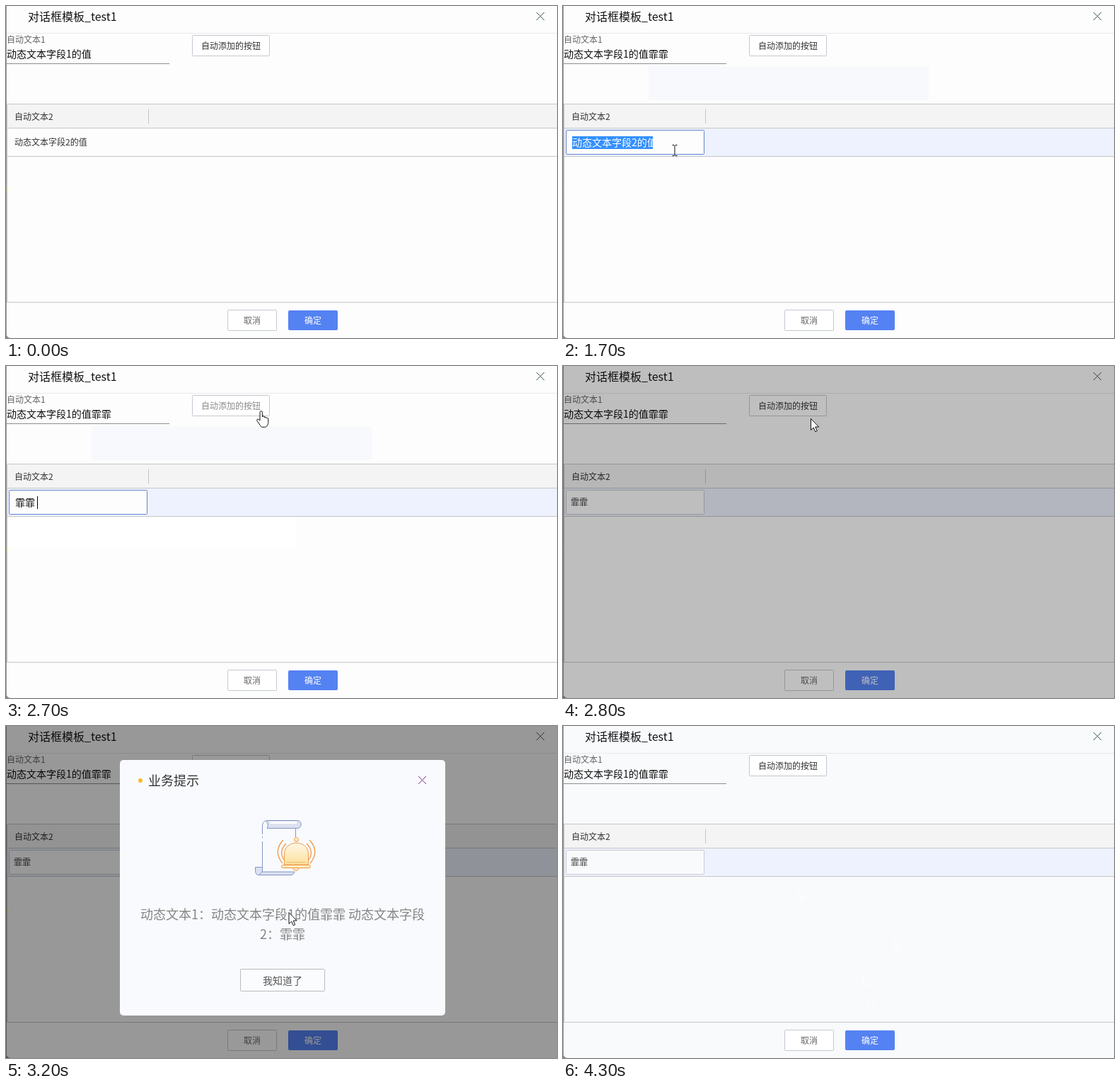
An HTML page for the animation above (4.9 s loop, 779 by 469 pixels).

```html
<!DOCTYPE html>
<html lang="zh-CN">
<head>
<meta charset="utf-8">
<title>对话框模板</title>
<style>
html, body { margin: 0; width: 779px; height: 469px; overflow: hidden; background: #fdfdfd; }
svg { display: block; font: 12px "Noto Sans CJK SC", "Noto Sans CJK", sans-serif; }
text { fill: #333; white-space: pre; }
.mid { text-anchor: middle; }
.s14 { font-size: 14px; }
.s18 { font-size: 18px; }
.dark { fill: #111; }
.line { fill: none; stroke: #c6c6c6; }
.box { fill: #fff; stroke: #c4c8d2; }
.cursor { fill: #fff; stroke: #111; stroke-linejoin: round; }
.roll { fill: #dce1f0; stroke: #8496c4; }
.paper { fill: none; stroke: #8496c4; }
.bell { fill: url(#gold); stroke: #f0994a; }
.wave { fill: none; stroke: #f0994a; stroke-width: 1.3; }
.trace { fill: none; stroke: #fff; }
</style>
</head>
<body>
<svg width="779" height="469" viewBox="0 0 779 469">
  <defs>
    <linearGradient id="gold" x2="0" y2="1">
      <stop stop-color="#fff8e6"/><stop offset="1" stop-color="#fde09a"/>
    </linearGradient>
    <path id="arrow" d="M.5 .5V16.5L4.2 13 6.7 18.8 9.2 17.7 6.7 12H11.7Z"/>
    <path id="hand" d="M5 14V2.4a1.7 1.7 0 0 1 3.4 0V9a1.5 1.5 0 0 1 3 .3V10a1.5 1.5 0 0 1 2.8.6V11a1.4 1.4 0 0 1 2.6.6V16c0 4-2 7.3-5 7.3H9c-2 0-3-1-4-3L1 14.5c-1-2 1-3.2 2.3-2Z"/>
    <path id="beam" d="M-3.5 -7.5H-1L0 -6.5 1 -7.5H3.5M0 -6.5V6.5M-3.5 7.5H-1L0 6.5 1 7.5H3.5" fill="none"/>
    <path id="cross" d="M0 0L11 11M11 0L0 11"/>
  </defs>

  <rect id="page" width="779" height="469"/>
  <path d="M.5 0V469" class="line" style="stroke:#999"/>
  <path d="M0 463Q1 468 6 469H0Z" fill="#888"/>
  <rect y="257" width="1" height="4" fill="#b5ad48"/>
  <text x="31" y="20.5" class="dark" font-size="16">对话框模板_test1</text>
  <use href="#cross" x="750" y="9" stroke="#3c5a42"/>
  <path d="M1 38.5H779" class="line" style="stroke:#e8e8e8"/>

  <rect id="panel1" x="121" y="85" width="396" height="48" fill="#f8f9fc"/>
  <text x="1" y="52" style="fill:#666">自动文本1</text>
  <text id="value1" x="1" y="73" class="s14 dark"></text>
  <path id="caret1" class="line" style="stroke:#000"/>
  <path d="M1 81.5H231" class="line" style="stroke:#8f8f8f"/>
  <rect x="263.5" y="41.5" width="109" height="29" rx="1" class="box"/>
  <text id="action" x="318" y="61" class="mid">自动添加的按钮</text>

  <rect x="2" y="139" width="777" height="33" fill="#f4f4f4"/>
  <rect id="row" x="2" y="173" width="777" height="39" fill="#eef2fe"/>
  <rect id="panel2" x="2" y="213" width="407" height="44" fill="#fff"/>
  <path d="M779 138.5H1.5V418.5H779M2 172.5H779M2 212.5H779M201.5 146V166" class="line"/>
  <text x="12" y="161">自动文本2</text>
  <rect id="input" x="4.5" y="175.5" width="195" height="34" rx="1"/>
  <rect id="selection" x="13" y="184" width="114" height="18" fill="#3390ff"/>
  <text id="value2"></text>
  <path id="caret2" d="M44.5 184V202" class="line" style="stroke:#000"/>

  <rect x="313.5" y="429.5" width="69" height="29" rx="1" class="box"/>
  <text x="348" y="449" class="mid" style="fill:#666">取消</text>
  <rect x="399" y="430" width="70" height="28" rx="2" fill="#5582f3"/>
  <text x="434" y="449" class="mid" style="fill:#fff;font-weight:500">确定</text>

  <rect id="dim" width="779" height="469"/>
  <g id="modal">
    <rect x="161" y="48" width="460" height="361" rx="5" fill="#f8fafd"/>
    <circle cx="190" cy="77" r="3" fill="#fbb929"/>
    <text x="201" y="84" class="s18">业务提示</text>
    <use href="#cross" x="583" y="71" stroke="#7c3a80"/>

    <path class="paper" d="M362.5 153V141Q362.5 133.5 370 133.5M362.5 156V158M362.5 163V199M409.5 144V157"/>
    <path class="roll" d="M370 133.5H412A5 5.3 0 0 1 412 144.5H369Q372 139 368 135.5Z"/>
    <path d="M373 136.5H411" stroke="#fff" stroke-width="3"/>
    <path class="roll" d="M352.5 199.5H362.5V204Q362.5 210.5 357.5 210.5T352.5 204Z"/>
    <path class="roll" d="M357.5 210.5H403Q407 210 408 206H362Z"/>
    <circle class="bell" cx="410.5" cy="160.5" r="3"/>
    <path class="bell" d="M393.5 196V181C393.5 160 427.5 160 427.5 181V196Z"/>
    <path d="M397 192.5H424" stroke="#f5ba68"/>
    <rect class="bell" x="389.5" y="196.5" width="41" height="4" rx="2"/>
    <path class="bell" d="M405.5 200.5H414.5Q413 204.5 410 204.5T405.5 200.5Z"/>
    <path class="wave" d="M392 161Q377 177 391 194M396 166Q385 177 393 189M429 161Q444 177 430 194M425 166Q436 177 428 189"/>

    <g class="mid s18">
      <text x="391" y="273" style="fill:#858585">动态文本1：动态文本字段1的值霏霏 动态文本字段</text>
      <text x="391" y="301" style="fill:#858585">2：霏霏</text>
    </g>
    <rect x="331.5" y="343.5" width="119" height="31" rx="1" fill="#fbfcfe" stroke="#bbb"/>
    <text x="391" y="365" class="mid s14" style="fill:#555">我知道了</text>
  </g>

  <g id="traces" class="trace">
    <use href="#arrow" x="332" y="228"/>
    <use href="#arrow" x="467" y="298"/>
    <use href="#arrow" x="432" y="381" opacity=".6"/>
    <use id="lastTrace" href="#arrow" x="423" y="352"/>
  </g>
  <use id="cursor" class="cursor"/>
</svg>
<script>
const LOOP = 4900, STEP = 100;
const $ = id => document.getElementById(id);
const show = (id, on) => { $(id).style.display = on ? "" : "none"; };
const set = (id, attrs) => {
  for (const key in attrs) $(id).setAttribute(key, attrs[key]);
};

// time, x, y, pointer shape from then on
const path = [
  [100, 404, 108, "arrow"], [300, 150, 68, "beam"], [500, 150, 68, "arrow"],
  [600, 155, 98, "arrow"], [1000, 155, 98, "arrow"], [1300, 158, 204, "beam"],
  [2200, 158, 204, "arrow"], [2500, 366, 78, "arrow"], [2600, 354, 63, "hand"],
  [2700, 354, 63, "hand"], [2800, 350, 74, "arrow"], [2900, 344, 97, "arrow"],
  [3100, 332, 228, "arrow"], [3300, 467, 298, "arrow"], [3500, 432, 381, "arrow"],
  [3700, 414, 357, "hand"], [4100, 414, 357, "hand"], [4200, 423, 352, "arrow"],
  [4300, 423, 352, "arrow"]
];
const dimming = [[2700, 0], [2800, .25], [2900, .4], [4000, .4], [4300, 0]];
const fading = [[2800, 0], [2900, .34], [3000, .8], [3100, 1], [4000, 1], [4300, 0]];

function at(keys, t, col = 1) {
  const i = keys.findIndex(key => key[0] > t);
  if (i < 0) return keys[keys.length - 1][col];
  if (!i) return keys[0][col];
  const a = keys[i - 1], b = keys[i];
  return a[col] + (b[col] - a[col]) * (t - a[0]) / (b[0] - a[0]);
}

function draw(t) {
  const during = (from, to) => t >= from && t < to;

  set("page", { fill: t >= 4100 ? "#f8fafc" : "#fdfdfd" });
  show("panel1", during(800, 2800));
  show("panel2", during(1900, 2800));

  const typed = t >= 1000;
  $("value1").textContent = "动态文本字段1的值" + (typed ? "霏霏" : "");
  const caretX = typed ? 149.5 : 121.5;
  set("caret1", { d: `M${caretX} 59V77` });
  show("caret1", during(400, 1400));
  $("action").style.fill = during(2600, 2800) ? "#8a8a8a" : "#333";

  const editing = during(1400, 2800), selected = during(1400, 1900);
  show("row", t >= 1300);
  show("input", t >= 1400);
  set("input", {
    fill: t >= 4100 ? "#f8fafc" : "#fdfdfd",
    stroke: editing ? "#6583cf" : "#c8cad2"
  });
  show("selection", selected);
  show("caret2", during(2000, 2800));
  $("value2").textContent = t < 1900 ? "动态文本字段2的值" : t < 2000 ? "" : "霏霏";
  $("value2").style.fill = selected ? "#fff" : editing ? "#111" : "#333";
  set("value2", {
    x: editing ? 13 : t < 1400 ? 12 : 11,
    y: editing ? 198 : 197,
    "font-size": editing ? 14 : 12
  });

  const shown = at(fading, t);
  const scale = .974 + .026 * Math.min(1, shown);
  set("dim", { opacity: at(dimming, t) });
  set("modal", {
    opacity: shown,
    transform: `translate(391 228.5) scale(${scale}) translate(-391 -228.5)`
  });

  show("traces", t >= 3700);
  show("lastTrace", t >= 4300);
  show("cursor", during(100, 4300));
  const [, , , shape] = path.filter(key => key[0] <= t).pop() || path[0];
  set("cursor", { href: "#" + shape, x: at(path, t), y: at(path, t, 2) });
}

const start = performance.now();
function tick() {
  const t = (performance.now() - start) % LOOP;
  draw(Math.floor(t / STEP) * STEP);
  requestAnimationFrame(tick);
}
tick();
</script>
</body>
</html>
```
